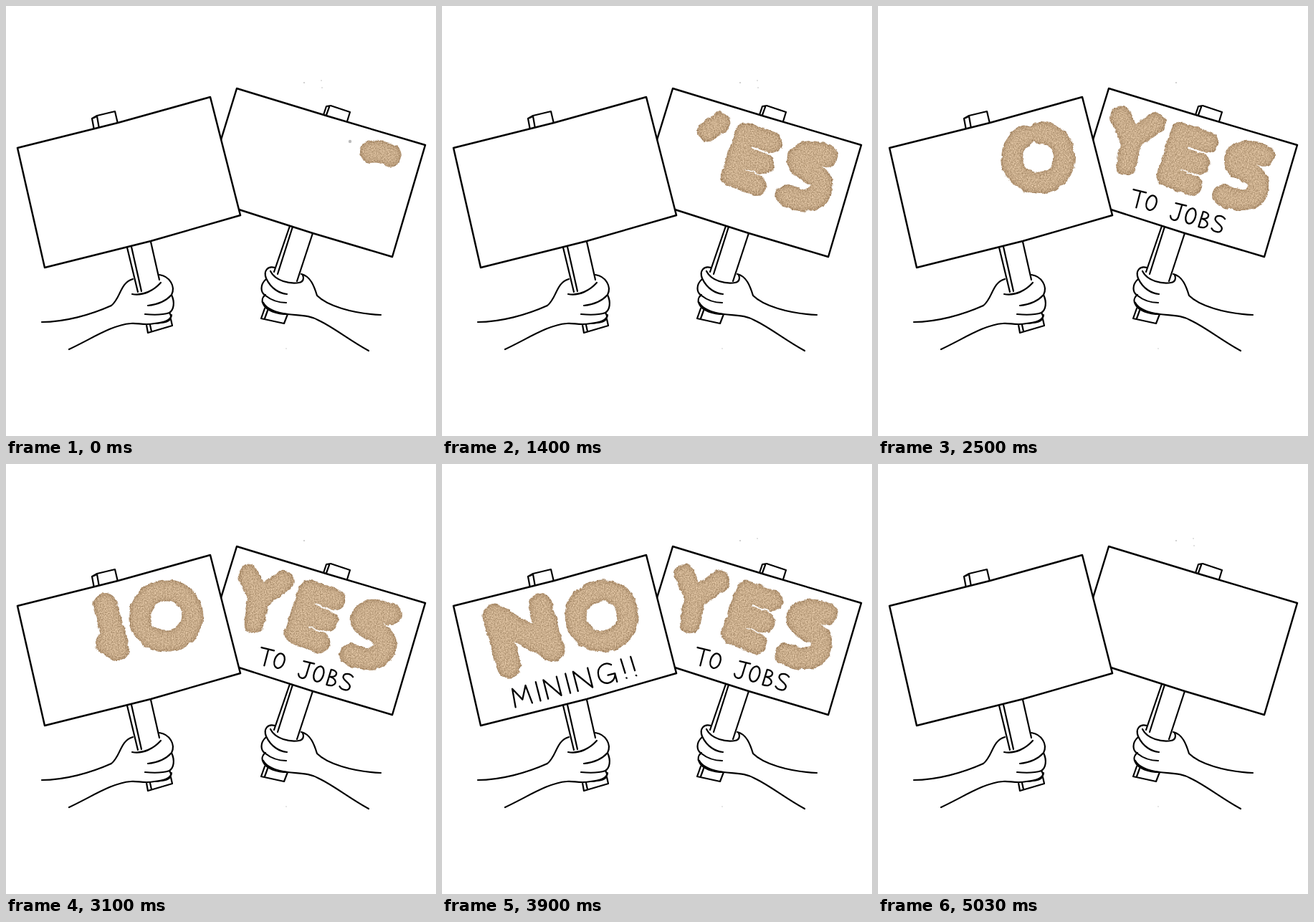
These frames come from a looping animation (600 px wide and 600 px high, 5200 ms). An HTML page:

```html
<!DOCTYPE html>
<html lang="en">
<head>
<meta charset="utf-8">
<title>Two signs</title>
<style>
html, body { margin: 0; width: 100%; height: 100%; overflow: hidden; background: #fff; }
svg { display: block; width: 100%; height: 100%; }
.ink { fill: none; stroke: #000; stroke-width: 2.2; stroke-linecap: round; stroke-linejoin: round; }
.board { fill: #fff; stroke-width: 2.5; }
.word { stroke-width: 2.3; }
#sand path { fill: none; stroke: #000; stroke-linecap: round; stroke-linejoin: round; }
</style>
</head>
<body>
<svg viewBox="0 0 600 600">
  <defs>
    <filter id="grit" filterUnits="userSpaceOnUse" x="0" y="0" width="600" height="600" color-interpolation-filters="sRGB">
      <feTurbulence id="wobble" type="fractalNoise" baseFrequency=".1" numOctaves="3" result="rough"/>
      <feDisplacementMap in="SourceGraphic" in2="rough" scale="6" xChannelSelector="R" yChannelSelector="G" result="shape"/>
      <feGaussianBlur in="shape" stdDeviation="4"/>
      <feColorMatrix values="0 0 0 .20 .59  0 0 0 .21 .47  0 0 0 .21 .34  0 0 0 0 1" result="shade"/>
      <feTurbulence id="grain" type="fractalNoise" baseFrequency=".6" numOctaves="2"/>
      <feColorMatrix values="1 0 0 0 0  1 0 0 0 0  1 0 0 0 0  0 0 0 0 1" result="noise"/>
      <feComposite in="shade" in2="noise" operator="arithmetic" k2="1" k3=".45" k4="-.225"/>
      <feComposite in2="shape" operator="in"/>
    </filter>
  </defs>
  <rect width="600" height="600" fill="#fff"/>

  <g class="ink">
    <!-- right sign -->
    <path d="M443 152L447 140L453 139L480 148L476 161M447 152L451 141"/>
    <path class="board" d="M322 115L450 154L585 194L539 350L428 317L275 268Z"/>
    <path d="M396 307L374 371M400 308L379 374M428 317L406 384"/>
    <path d="M523 431C482 429 448 418 434 404C430 391 425 377 412 374"/>
    <path d="M506 481C480 467 458 449 437 439C424 431 410 432 393 430C378 430 363 425 359 416C356 411 358 406 362 403"/>
    <path d="M375 365C365 362 359 370 363 380C370 395 382 401 392 402M363 381C354 389 355 400 362 404C372 412 383 414 391 414M359 414C363 422 376 428 393 430M369 370C376 384 396 388 409 386C415 385 416 380 414 375"/>
    <path d="M361 422L356 436L388 443L393 430M365 425L361 436"/>
    <!-- left sign -->
    <path d="M123 173L120 157L127 153L152 147L156 164M130 171L127 154M120 157L125 155"/>
    <path class="board" d="M16 198L156 163L285 127L327 292L202 328L54 365Z"/>
    <path d="M169 337L184 399M175 336L189 398M202 329L214 382"/>
    <path d="M50 441C82 441 118 431 147 418C160 408 159 386 177 381"/>
    <path d="M88 479C120 464 148 445 174 443C184 442 193 446 207 443C221 442 230 439 231 431"/>
    <path d="M214 375C228 377 237 391 231 403C222 413 208 417 198 418M231 403C236 414 234 424 228 428C216 432 204 431 194 430M228 428C233 435 229 441 216 442M176 402C192 405 207 396 216 386"/>
    <path d="M196 445L198 456L232 446L230 437M201 445L203 454"/>
  </g>

  <g id="jobs" class="ink word" transform="translate(360 255) rotate(17)">
    <path d="M-3 2L15 1M7 2L8 25"/>
    <path d="M26 2C18 3 17 22 26 23C35 23 36 2 26 2Z"/>
    <path d="M59 3L74 2M68 3L68 21C67 28 59 28 57 22"/>
    <path d="M84 3C76 4 75 24 84 25C93 25 93 3 84 3Z"/>
    <path d="M99 3L99 25M99 3C110 1 111 12 100 13C114 13 113 26 99 25"/>
    <path d="M131 4C126 0 117 2 118 8C119 13 131 13 131 19C131 26 121 26 117 22"/>
  </g>
  <g id="mining" class="ink word" transform="translate(93 314) rotate(-14.5)">
    <path d="M3 27L5 1L15 19L24 1L27 27M39 0L39 27M50 27L50 0L69 27L69 0M82 -1L82 27M93 27L93 -1L114 27L114 -1"/>
    <path d="M147 3C140 -4 126 0 126 14C126 30 147 31 149 16L139 16M149 16L149 28"/>
    <path d="M162 -1L163 19M163 26L163.3 26.5M176 -1L177 19M177 26L177.3 26.5"/>
  </g>

  <g id="sand" filter="url(#grit)"></g>
  <g fill="#bbb">
    <circle cx="416" cy="107" r=".9"/>
    <circle id="dustA" cx="440" cy="104" r=".8"/>
    <circle id="dustB" cx="441" cy="114" r=".8"/>
    <circle cx="391" cy="478" r=".7"/>
    <circle id="crumb" cx="480" cy="189" r="2.2"/>
  </g>
</svg>
<script>
const LOOP = 5200, STEP = 100, CLEAR = 4830, LAST = 5030;
const $ = id => document.getElementById(id);

// Each stroke: path, time it starts growing, time it is whole.
const letters = [
  { w: 31, gone: 4700, strokes: [
    ["M537 209C521 202 501 201 497 214C494 231 529 232 530 248C531 270 511 278 481 265", -130, 600]] },
  { w: 30, gone: 4800, strokes: [
    ["M460 190L424 177L404 237L438 250", 600, 1160],
    ["M413 208L449 220", 1100, 1300]] },
  { w: 29, gone: 4830, strokes: [
    ["M388 163L353 188", 1300, 1500],
    ["M339 154L353 188", 1500, 1700],
    ["M353 188L347 222", 1700, 2000]] },
  { w: 30, gone: 4890, strokes: [
    ["M224 176C245 175 260 192 260 211C260 232 244 247 224 247C203 247 187 231 187 212C187 192 204 176 224 176", 2000, 2550]] },
  { w: 34, gone: 4960, strokes: [
    ["M138 197L155 258", 2550, 3050],
    ["M155 258L75 212", 3050, 3350],
    ["M74 212L94 281", 3300, 3600]] }
];

for (const l of letters) {
  l.g = $("sand").appendChild(document.createElementNS("http://www.w3.org/2000/svg", "g"));
  l.paths = l.strokes.map(([d]) => {
    const p = document.createElementNS("http://www.w3.org/2000/svg", "path");
    p.setAttribute("d", d);
    p.setAttribute("stroke-width", l.w);
    p.setAttribute("pathLength", 1);
    return l.g.appendChild(p);
  });
}

const show = (el, on) => { el.style.display = on ? "" : "none"; };
const jitter = n => { const v = Math.sin(n * 12.9898) * 43758.5453; return (v - Math.floor(v) - .5) * 1.6; };

function snap(t) {
  if (t < CLEAR) return Math.floor(t / STEP) * STEP;
  if (t >= LAST) return LAST;
  return CLEAR + Math.floor((t - CLEAR) * 3 / 200) * 200 / 3;
}

function draw(t) {
  const n = Math.floor(t / 60);
  letters.forEach((l, i) => {
    show(l.g, t < l.gone);
    let dx = jitter(n + i * 31), dy = jitter(n * 3 + i * 17);
    // The finished words are nudged, then S is pushed off first.
    if (t >= 4300) dx += i === 2 || i === 4 ? 6 : 2;
    if (i === 0 && t >= 4600) { dx += 5; dy += 14; }
    l.g.setAttribute("transform", `translate(${dx} ${dy})`);
    l.strokes.forEach(([, a, b], k) => {
      const p = Math.min(1, (t - a) / (b - a));
      show(l.paths[k], p > 0);
      l.paths[k].setAttribute("stroke-dasharray", p < 1 ? `${Math.max(p, 0)} 2` : "none");
    });
  });
  $("wobble").setAttribute("seed", n);
  $("grain").setAttribute("seed", n + 7);
  show($("jobs"), t >= 2100 && t < LAST);
  show($("mining"), t >= 3800 && t < LAST);
  show($("dustA"), t < 2100 || t >= 3800);
  show($("dustB"), t < 2100 || t >= LAST);
  show($("crumb"), t < 200);
}

const start = performance.now();
let shown = -1;
function tick() {
  const t = snap((performance.now() - start) % LOOP);
  if (t !== shown) draw(shown = t);
  requestAnimationFrame(tick);
}
tick();
</script>
</body>
</html>
```
